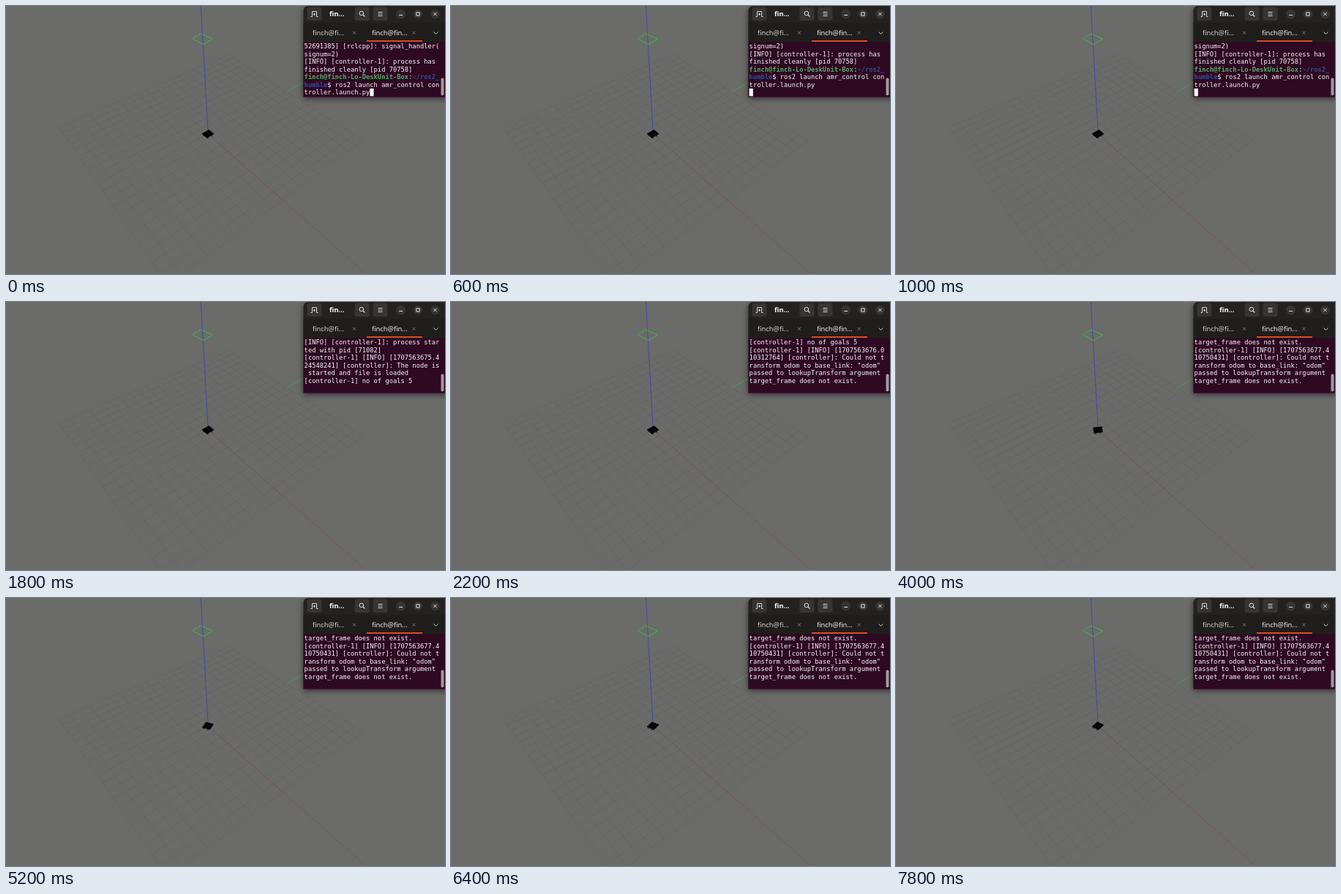
These frames come from a looping animation (600x367 px, 8000 ms). An HTML page with a canvas:

```html
<!DOCTYPE html>
<html lang="en">
<head>
<meta charset="utf-8">
<title>Robot controller launch</title>
<style>
  html, body { margin: 0; width: 100%; height: 100%; overflow: hidden; background: #6b6b6a; }
  canvas { display: block; }
</style>
</head>
<body>
<canvas id="stage"></canvas>
<script>
const W = 600, H = 367, LOOP = 8000, STEP = 200;
const canvas = document.getElementById('stage');
const ctx = canvas.getContext('2d');
const dpr = window.devicePixelRatio || 1;
canvas.width = W * dpr;
canvas.height = H * dpr;
canvas.style.width = W + 'px';
canvas.style.height = H + 'px';

// ---------- drawing helpers ----------
function path(points, close) {
  ctx.beginPath();
  points.forEach(([x, y], i) => i ? ctx.lineTo(x, y) : ctx.moveTo(x, y));
  if (close) ctx.closePath();
}
function stroke(points, color, width = 1, close = false) {
  path(points, close);
  ctx.strokeStyle = color;
  ctx.lineWidth = width;
  ctx.stroke();
}
function fill(points, color) {
  path(points, true);
  ctx.fillStyle = color;
  ctx.fill();
}
function box(x, y, w, h, color, radius = 0) {
  ctx.beginPath();
  ctx.roundRect(x, y, w, h, radius);
  ctx.fillStyle = color;
  ctx.fill();
}
function disc(x, y, r, color) {
  ctx.beginPath();
  ctx.arc(x, y, r, 0, Math.PI * 2);
  ctx.fillStyle = color;
  ctx.fill();
}
function text(str, x, y, font, color) {
  ctx.font = font;
  ctx.fillStyle = color;
  ctx.fillText(str, x, y);
}
function cross(x, y, r, color, width) {
  stroke([[x - r, y - r], [x + r, y + r]], color, width);
  stroke([[x + r, y - r], [x - r, y + r]], color, width);
}

// ---------- ground plane ----------
const ORIGIN = [276, 175];
const VX = [-237, -281], VY = [1116, -281]; // vanishing points of -x and +y
const KX = 0.0166, KY = 0.0146;

function ground(x, y) {
  const a = -x * KX, b = y * KY, d = 1 + a + b;
  return [0, 1].map(i => (ORIGIN[i] + a * VX[i] + b * VY[i]) / d);
}

function drawWorld() {
  ctx.fillStyle = '#6b6b6a';
  ctx.fillRect(0, 0, W, H);
  for (let i = -10; i <= 10; i++) {
    stroke([ground(i, -10), ground(i, 10)], 'rgba(70,70,74,.2)', 0.7);
    stroke([ground(-10, i), ground(10, i)], 'rgba(70,70,74,.2)', 0.7);
  }
  stroke([ORIGIN, [491, 366]], 'rgba(130,62,62,.45)', 0.9);
  stroke([[383, 118], [407, 104.5]], '#4d9a4d', 0.9);
  stroke([[266.3, 0], [276, 170]], '#4242b2', 0.9);
  stroke([[255, 44.8], [266.5, 38], [282.5, 45], [270, 52.5]], '#40b440', 1, true);
}

function heading(t) {
  return t < 3600 ? 0 : -75 * (1 - Math.exp((3500 - t) / 1000)) * Math.PI / 180;
}

function drawRobot(t) {
  const a = heading(t), c = Math.cos(a), s = Math.sin(a), half = 0.41;
  const at = (u, v) => ground(half * (u * c - v * s), half * (u * s + v * c));
  const plate = [[-1, -1], [-1, 1], [1, 1], [1, -1]].map(p => at(...p));
  for (const p of [[0.9, 0.4], [0.9, -0.6], [-0.4, -0.9]]) {
    const [x, y] = at(...p);
    box(x - 1, y + 0.4, 2.2, 1.6, '#34312f');
  }
  fill(plate, '#050505');
  const [x, y] = at(0.1, 0.2);
  disc(x, y, 0.6, '#1c2e48');
}

// ---------- terminal ----------
const COLS = 35, ROWS = 7, CELL = 5.28, PITCH = 10.5, LEFT = 407.6, BASE = 58;
const MONO = '8.77px "DejaVu Sans Mono", "Noto Sans Mono", monospace';
const UI = '9.3px "Noto Sans", "Open Sans", sans-serif';
const WHITE = '#f8f5f7', GREEN = '#58aa68', BLUE = '#364c90';

const plain = s => [[s, WHITE]];
const say = (stamp, s) => plain(`[controller-1] [INFO] [${stamp}] ${s}`);
const missing = stamp => say(stamp,
  '[controller]: Could not transform odom to base_link: "odom" passed to lookupTransform argument target_frame does not exist.');

const log = [
  [0, say('1707563655.052691385', '[rclcpp]: signal_handler(signum=2)')],
  [0, plain('[INFO] [controller-1]: process has finished cleanly [pid 70758]')],
  [0, [['finch@finch-Lo-DeskUnit-Box', GREEN, true], [':', WHITE], ['~/ros2_humble', BLUE, true],
       ['$ ros2 launch amr_control controller.launch.py', WHITE]]],
  [1200, plain('[INFO] [launch]: All log files can be found below /home/finch/.ros/log')],
  [1200, plain('[INFO] [launch]: Default logging verbosity is set to INFO')],
  [1400, plain('[INFO] [controller-1]: process started with pid [71082]')],
  [1600, say('1707563675.424548241', '[controller]: The node is started and file is loaded')],
  [1600, plain('[controller-1] no of goals 5')],
  [2200, missing('1707563676.010312764')],
  [2400, missing('1707563676.190518306')],
  [2800, missing('1707563676.590409837')],
  [3200, missing('1707563677.000627195')],
  [3600, missing('1707563677.410750431')]
];
const ENTER = 400;

// Splits coloured spans into rows of COLS cells.
function wrap(spans) {
  const rows = [[]];
  let col = 0;
  for (const [str, color, bold] of spans) {
    let rest = str;
    while (rest) {
      if (col === COLS) { rows.push([]); col = 0; }
      const part = rest.slice(0, COLS - col);
      rows[rows.length - 1].push({ part, col, color, bold });
      col += part.length;
      rest = rest.slice(part.length);
    }
  }
  return rows;
}

function drawRows(t) {
  const rows = log.filter(([at]) => at <= t).flatMap(([, spans]) => wrap(spans));
  if (t >= ENTER) rows.push([]);
  const shown = rows.slice(-ROWS);
  shown.forEach((row, i) => {
    for (const { part, col, color, bold } of row)
      text(part, LEFT + col * CELL, BASE + i * PITCH, (bold ? 'bold ' : '') + MONO, color);
  });
  if (t < 1200) {
    const last = shown[ROWS - 1], end = last[last.length - 1];
    const col = end ? end.col + end.part.length : 0;
    box(LEFT + col * CELL, BASE + (ROWS - 1) * PITCH - 8, 5.2, 10.4, '#ffffff');
  }
}

function drawFrame() {
  ctx.save();
  ctx.shadowColor = 'rgba(0,0,0,.6)';
  ctx.shadowBlur = 9 * dpr;
  ctx.shadowOffsetY = 2 * dpr;
  box(406.5, 0, 200, 124.5, '#242221', [6, 0, 0, 0]);
  ctx.restore();
}

function drawHeader() {
  const ink = '#e6e4e2', dim = '#86827f', button = '#373534';
  box(406.5, 23, 193.5, 26, '#201e1d');

  for (const x of [411.5, 476.5, 501.5]) box(x, 1.5, 20, 18.5, button, 3);
  stroke([[416.5, 14.5], [418.5, 14.5], [418.5, 7.5], [424.5, 7.5], [424.5, 14.5], [426.5, 14.5]], ink, 0.9);
  stroke([[421.5, 9.7], [421.5, 12.9]], ink, 0.9);
  stroke([[419.9, 11.3], [423.1, 11.3]], ink, 0.9);
  text('fin…', 442, 14, 'bold ' + UI, '#ffffff');

  ctx.beginPath();
  ctx.arc(485.8, 10, 2.8, 0, Math.PI * 2);
  ctx.strokeStyle = ink;
  ctx.lineWidth = 1;
  ctx.stroke();
  stroke([[487.8, 12], [490.3, 14.5]], ink, 1.1);
  for (const y of [8.5, 11, 13.5]) stroke([[508.5, y], [514.5, y]], ink, 0.9);

  for (const x of [539.7, 563, 586.5]) disc(x, 11, 6.3, button);
  stroke([[537.3, 12.5], [542.1, 12.5]], ink, 1);
  stroke([[560.8, 8.8], [565.2, 8.8], [565.2, 13.2], [560.8, 13.2]], ink, 1, true);
  cross(586.5, 11, 2.1, ink, 1);

  text('finch@fi…', 419, 40, UI, '#d2cfcd');
  cross(476, 36.7, 2, dim, 0.9);
  text('finch@fin…', 500, 40, UI, '#f2f0ee');
  cross(557.5, 36.7, 2, dim, 0.9);
  stroke([[584.5, 35.5], [587.5, 38.5], [590.5, 35.5]], ink, 0.9);
}

function drawTerminal(t) {
  drawFrame();
  drawHeader();
  box(406.5, 49, 193.5, 75.5, '#2e0922');
  box(493, 47, 76, 2, '#e2491f');
  drawRows(t);
  box(594.5, 98.5, 4, 24, '#a39aa0', 2);
}

// ---------- loop ----------
function draw(now) {
  const t = Math.floor((now % LOOP) / STEP) * STEP;
  ctx.setTransform(dpr, 0, 0, dpr, 0, 0);
  drawWorld();
  drawRobot(t);
  drawTerminal(t);
}

let start;
function tick(now) {
  if (start === undefined) start = now;
  draw(now - start);
  requestAnimationFrame(tick);
}
draw(0);
requestAnimationFrame(tick);
</script>
</body>
</html>
```
